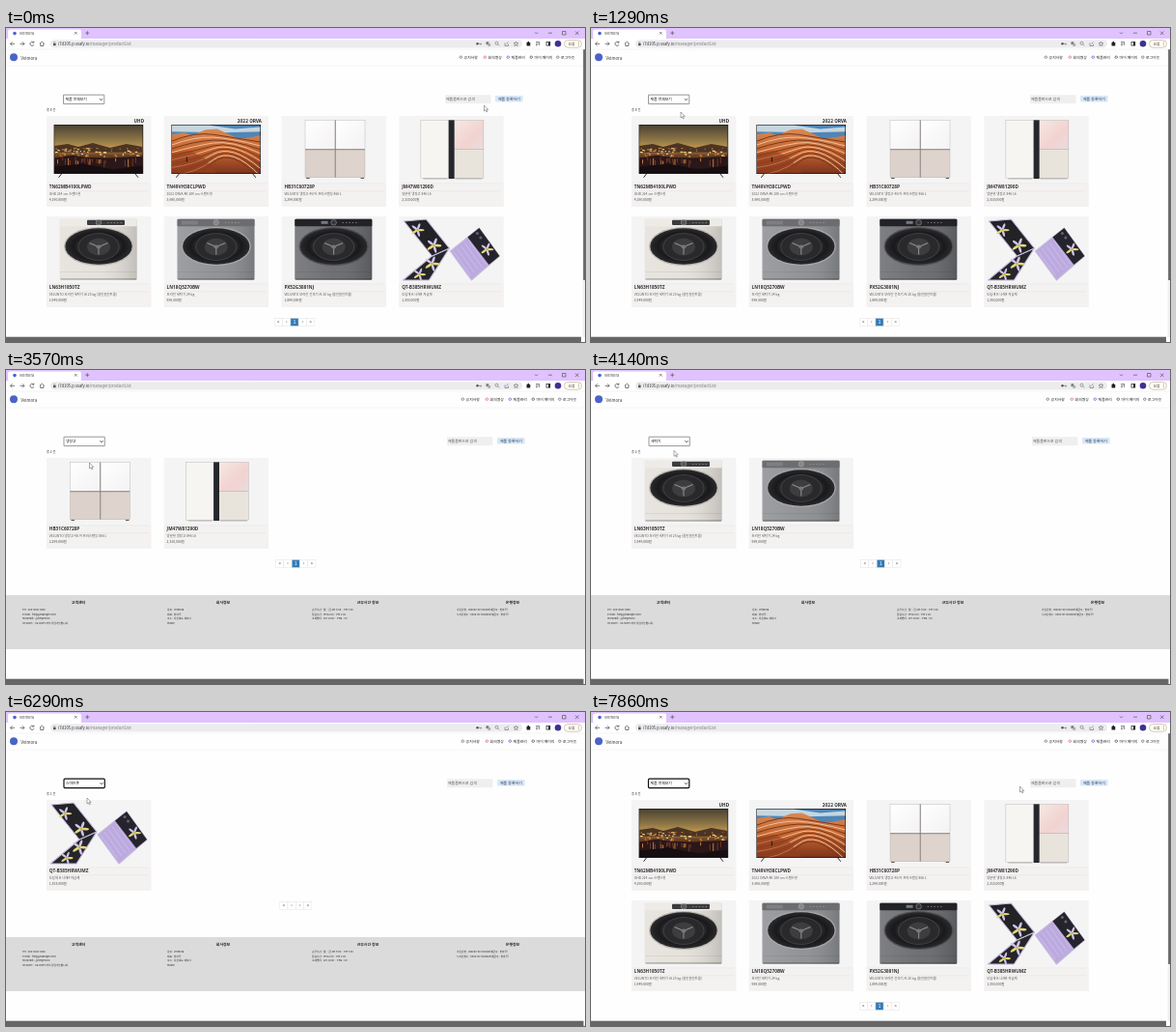
These frames come from a looping animation (600x325 px, 8000 ms). An HTML page:

```html
<!DOCTYPE html>
<html lang="ko">
<head>
<meta charset="utf-8">
<title>Velmora</title>
<style>
html, body { margin: 0; width: 100%; height: 100%; overflow: hidden; background: #fff; }
svg { display: block; width: 600px; height: 325px; font-family: 'Noto Sans CJK KR', 'Noto Sans', sans-serif; }
</style>
</head>
<body>
<svg viewBox="0 0 600 325">
  <defs>
    <linearGradient id="dusk" x2="0" y2="1">
      <stop stop-color="#4b4233"/><stop offset=".3" stop-color="#8a7447"/><stop offset=".5" stop-color="#c99a4c"/>
      <stop offset=".62" stop-color="#6d4424"/><stop offset="1" stop-color="#1c1012"/>
    </linearGradient>
    <linearGradient id="rock" x2="0" y2="1">
      <stop stop-color="#d98a55"/><stop offset=".5" stop-color="#c4642f"/><stop offset="1" stop-color="#7d351d"/>
    </linearGradient>
    <linearGradient id="rose" x2="1" y2="1">
      <stop stop-color="#f6e8e4"/><stop offset=".6" stop-color="#f1d3d0"/><stop offset="1" stop-color="#eadbe0"/>
    </linearGradient>
    <linearGradient id="white" x2="1" y2="1">
      <stop stop-color="#fff"/><stop offset="1" stop-color="#f4f2f3"/>
    </linearGradient>
    <linearGradient id="shade" x2="1">
      <stop stop-color="#fff" stop-opacity=".15"/><stop offset=".5" stop-color="#fff" stop-opacity=".05"/>
      <stop offset="1" stop-color="#000" stop-opacity=".15"/>
    </linearGradient>
    <radialGradient id="glass">
      <stop stop-color="#6a6a6c"/><stop offset=".45" stop-color="#3c3c3e"/><stop offset=".75" stop-color="#19191b"/><stop offset="1" stop-color="#2a2a2c"/>
    </radialGradient>
  </defs>
  <g id="page"></g>
  <g id="chrome"></g>
  <path id="cursor" d="M0 0V6L1.4 4.8 2.4 6.9 3.3 6.5 2.4 4.4H4.2Z" fill="#fff" stroke="#555" stroke-width=".5"/>
</svg>
<script>
const $ = id => document.getElementById(id);
const rect = (x, y, w, h, fill, more = '') => `<rect x="${x}" y="${y}" width="${w}" height="${h}" fill="${fill}" ${more}/>`;
const text = (x, y, size, s, fill = '#333', more = '') => `<text x="${x}" y="${y}" font-size="${size}" fill="${fill}" ${more}>${s}</text>`;
const poly = (points, fill, more = '') => `<polygon points="${points}" fill="${fill}" ${more}/>`;
const oval = (x, y, rx, ry, fill, more = '') => `<ellipse cx="${x}" cy="${y}" rx="${rx}" ry="${ry}" fill="${fill}" ${more}/>`;
const line = (d, color, w = .6) => `<path d="${d}" fill="none" stroke="${color}" stroke-width="${w}"/>`;
const times = (n, f) => Array.from({ length: n }, (_, i) => f(i)).join('');
const noise = i => Math.abs(Math.sin(i * 127.1 + 3) * 43758.5) % 1;
const bold = 'font-weight="700"';
const medium = 'font-weight="500"';
const mid = 'text-anchor="middle"';

// Product pictures, in coordinates of their card
const tv = (label, scene) =>
  text(101, 7.4, 4.7, label, '#222', bold + ' text-anchor="end"') +
  rect(7.6, 9, 92.6, 51, '#1d1a1b') +
  `<svg x="8.1" y="9.5" width="91.6" height="49.7" viewBox="0 0 92 51" preserveAspectRatio="none">${scene}</svg>` +
  line('M15.5 60L12.5 63.8M92 60L95 63.8', '#333', 1);

const city = rect(0, 0, 92, 51, 'url(#dusk)') +
  poly('0,22 14,20 25,23 40,19 58,24 75,20 92,23 92,29 0,29', '#4a3424') +
  times(80, i => rect(noise(i) * 92, 24 + noise(i + 200) * 9, .8 + noise(i + 7) * 2.4, 1,
    ['#ffd877', '#e58a32', '#fff0b8', '#a4482a'][i % 4])) +
  poly('0,35 18,32 34,34 56,35 92,33 92,51 0,51', '#2a171a') +
  times(26, i => rect(noise(i + 40) * 92, 34 + noise(i + 90) * 5, .9, 3 + noise(i) * 6, i % 3 ? '#7c3b26' : '#d2893f')) +
  poly('0,44 30,41 62,47 92,43 92,51 0,51', '#170e11');

const canyon = rect(0, 0, 92, 51, '#4f86b8') +
  poly('0,0 38,0 66,4 92,2 92,7 52,8 0,7', '#c5d6e0') +
  poly('0,10 13,8 21,11 35,5 47,4 58,9 70,15 92,11 92,51 0,51', 'url(#rock)') +
  times(11, i => line(`M0 ${17 + i * 4}Q24 ${7 + i * 5} 43 ${10 + i * 3}T92 ${18 + i * 4}`, i % 2 ? '#f0c29a' : '#7d3519', 1)) +
  poly('0,30 18,27 34,35 47,51 0,51', '#96401f', 'opacity=".6"') + rect(15, 34, 1.2, 5, '#222');

const door = (x, y, w, h, fill) => rect(x, y, w, h, fill, 'stroke="#a9a2a0" stroke-width=".35"');
const fourDoor =
  door(24.4, 4.5, 31, 30, 'url(#white)') + door(56, 4.5, 30.4, 30, 'url(#white)') +
  door(24.4, 35, 31, 28.8, '#ddd2cb') + door(56, 35, 30.4, 28.8, '#ded4cd') +
  line('M24.4 34.7H86.4M55.7 4.5V63.8', '#77706e', .7) + line('M25.5 64.5H29M82 64.5H85.5', '#555', 1);
const sideBySide =
  door(22.5, 4.5, 29, 60, '#f7f5f1') + door(57, 4.5, 30.5, 30, 'url(#rose)') + door(57, 34.8, 30.5, 29.7, '#e8e4db') +
  rect(51.3, 4.3, 5.9, 60.7, '#25272c') + line('M25 65H50M58 65H86', '#888', .6);

function machine(body, panel, ring, display) {
  return rect(13.7, 2.8, 80, 63, body, 'rx="1.2"') + rect(13.7, 2.8, 80, 63, 'url(#shade)', 'rx="1.2"') +
    rect(13.7, 2.8, 80, 7.5, panel, 'rx="1"') + display +
    oval(54, 31, 36, 20, ring) + oval(54, 31, 34.7, 18.7, 'url(#glass)') +
    oval(54, 31.5, 21, 14, '#29292b', 'stroke="#5d5d60" stroke-width=".5"') + oval(54, 31.5, 12, 9, '#3d3d40') +
    times(3, i => {
      const a = (i * 120 + 90) * Math.PI / 180;
      return line(`M54 31.5L${54 + 11 * Math.cos(a)} ${31.5 + 8 * Math.sin(a)}`, '#8d8d90', 1.1);
    }) + oval(54, 31.5, 2.5, 2.1, '#77777a') + line('M14 57.5H93.4', '#0002', .5) + rect(14.5, 64, 78.5, 1.8, '#0003');
}
const dial = color => oval(54, 6.3, 2.8, 2.8, color, 'stroke="#aaa" stroke-width=".5"');
const dots = times(5, i => rect(63 + i * 3.4, 6, 1.4, .6, '#aaa'));
const creamWasher = machine('#e4e0da', '#eeebe6', '#bcb8b2', rect(42, 3.8, 39, 5.3, '#3b3b3e', 'rx="1"') + dial('#55555a') + dots);
const greyWasher = machine('#8c8e91', '#6b6d70', '#a7a8ab', rect(18, 4.5, 17, 4, '#7d7f82') + dial('#85878b') + dots);
const dryer = machine('#68696d', '#222327', '#505155', dial('#35363b') + rect(41, 4.8, 7, 3, '#737984') + dots);

const bloom = (x, y, r) => times(5, i => oval(x, y - r, r * .34, r, i % 2 ? '#e3da7a' : '#cfc4ea',
  `transform="rotate(${i * 72 + 20} ${x} ${y})"`)) + oval(x, y, r * .3, r * .3, '#c9b848');
const edge = 'stroke="#c6bbdc" stroke-width="1.1" stroke-linejoin="round"';
const phones =
  poly('4,66 31,66 52,33 34,41', '#25252b', edge) + poly('5,5 28,3 52,33 34,41', '#222227', edge) +
  bloom(19, 14, 3.6) + bloom(36, 30, 4) + bloom(34, 49, 4) + bloom(21, 60, 3.3) +
  poly('53,36 83,12 104,41 75,66', '#bcaadf', edge) + poly('71,21.5 83,12 104,41 93,50', '#25242c') +
  times(5, i => line(`M${56 + i * 4} ${36 - i * 2.8}L${74 + i * 4} ${61 - i * 2.8}`, '#cdc0ec', .8)) +
  bloom(91, 34, 3.5) + oval(81, 17.5, 1.5, 1.5, '#66636c') + oval(84.5, 22, 1.5, 1.5, '#66636c');

const products = [
  ['TN62MB4100LPWD', 'UHD 214 cm 스탠드형', '4,190,000', tv('UHD', city)],
  ['TN49VH38CLPWD', '2022 ORVA 4K 189 cm 스탠드형', '3,690,000', tv('2022 ORVA', canyon)],
  ['HB31C60728P', 'VELUNTO 냉장고 4도어 프리스탠딩 866 L', '2,299,000', fourDoor],
  ['JM47W81290D', '양문형 냉장고 846 L6', '2,310,000', sideBySide],
  ['LN63H1850TZ', 'VELUNTO 모리안 세탁기 AI 25 kg [올인원컨트롤]', '1,949,000', creamWasher],
  ['LN18Q5270BW', '모리안 세탁기 24 kg', '959,000', greyWasher],
  ['PX52G3081NJ', 'VELUNTO 모리안 건조기 AI 20 kg [올인원컨트롤]', '1,899,000', dryer],
  ['QT-B385HRWUMZ', '도담새 K 나래4 자급제', '1,353,000', phones],
];

function card(product, i) {
  const [code, about, price, picture] = products[product];
  return `<g transform="translate(${42 + i % 4 * 121.8} ${91 + (i >> 2) * 104})">` +
    rect(0, 0, 108.3, 94, '#f4f4f4') + rect(0, 69.5, 108.3, 24.5, '#f4f1f1') + picture +
    line('M2 70H106M2 77.8H106', '#e6e1e1', .5) +
    text(2.8, 75.4, 4.7, code, '#333', 'font-weight="600" font-family="Noto Sans, sans-serif"') +
    text(2.8, 82.2, 3.35, about, '#555') + text(2.8, 88, 3.4, price + '원', '#444') + '</g>';
}

const footer = [
  ['고객센터', 'Tel : 000-0000-0000', 'E-mail : help@example.com', 'MoruTalk : @helper204', '09:00AM ~ 06:00PM 까지 상담가능합니다.'],
  ['회사정보', '상호 : Velmora', '대표 : 한아무', '주소 : 다온북도 새미시', 'MIRAE'],
  ['근무시간 정보', '근무시간 : 월 ~ 금 AM 9:00 ~ PM 7:00', '점심시간 : PM12:00 ~ PM 1:00', '고객센터 : AM 10:00 ~ PM6 : 00'],
  ['은행정보', '가온은행 : 000000-00-000000(예금주 : 한아무)', '누리은행소 : 0000-00-0000000(예금주 : 한아무)'],
];
const footerMarkup = rect(0, 233, 600, 56, '#dcdbdc') + footer.map(([title, ...rows], i) =>
  text(75 + i * 150, 242.4, 3.9, title, '#222', mid + ' ' + bold) +
  rows.map((row, j) => text(17 + i * 150, 249 + j * 4.6, 2.65, row, '#222', medium)).join('')).join('');

const nav = [[471, '공지사항', '#666'], [496, '회의영상', '#d8578b'], [520, '제품관리', '#5b51c5'],
  [544, '마이 페이지', '#444'], [571.5, '로그아웃', '#666']];

function pager(tall, count) {
  const marks = count > 1 ? ['«', '‹', '1', '›', '»'] : ['«', '‹', '›', '»'];
  const x0 = (tall ? 299 : 300.3) - (marks.length - 1) * 4.15, y = tall ? 300.3 : 196.3;
  return marks.map((m, i) => {
    const x = x0 + i * 8.3, on = m === '1';
    return rect(x - 4.1, y, 8.2, 8.2, on ? '#337ab7' : '#fff', 'stroke="#e3e3e3" stroke-width=".5"') +
      text(x, y + 5.9, 5.4, m, on ? '#fff' : '#555', mid);
  }).join('');
}

function pageMarkup({ label, list, focus }) {
  const tall = list.length > 4, dx = tall ? 0 : 2, sx = tall ? 59.5 : 60;
  return rect(0, 22, 600, 303, '#fefefe') + oval(8, 30.3, 4, 4, '#4b63c8') + text(15.5, 32.5, 4.3, 'Velmora', '#333') +
    nav.map(([x, name, color]) => oval(x + dx + .3, 30.2, 1.3, 1.2, 'none', `stroke="${color}" stroke-width=".7"`) +
      text(x + dx + 3.6, 31.8, 3.85, name, '#222', medium)).join('') +
    line('M0 39H600', '#efefef', .6) +
    rect(sx, 69.2, 42.3, 9.4, '#fff', `rx="${focus ? 1 : .3}" stroke="${focus ? '#111' : '#555'}" stroke-width="${focus ? 1.2 : .6}"`) +
    text(sx + 2, 75.3, 3.85, label, '#111', medium) + line(`M${sx + 37.5} 73.2l1.5 1.6 1.5-1.6`, '#222', .8) +
    text(42, 86.4, 3.2, `총 ${list.length} 건`, '#222', medium) +
    rect(455 + dx, 69.3, 47.5, 9, '#efefef', 'rx=".8"') + text(456 + dx, 75.1, 3.9, '제품품번으로 검색', '#555') +
    rect(507 + dx, 70, 28.7, 6.5, '#d9e8f8', 'rx=".8"') + text(521.4 + dx, 74.7, 3.95, '제품 등록하기', '#26364f', mid + ' ' + medium) +
    list.map(card).join('') + pager(tall, list.length) + (tall ? '' : footerMarkup) +
    rect(0, 319.7, tall ? 596 : 598.5, 5.3, '#666') +
    (tall ? rect(597.5, 22, 2.5, 298, '#f1f1f1') + rect(598.2, 22, 1.8, 239, '#666') : '');
}

$('chrome').innerHTML = rect(0, 0, 600, 11, '#dfc2fe') + rect(2, 1.5, 76, 10, '#fff', 'rx="2"') +
  oval(9, 5.6, 1.8, 1.8, '#4b63c8') + text(14, 7, 3.9, 'Velmora', '#444') +
  line('M71 4l2.6 2.6m0-2.6l-2.6 2.6M82.3 5.2h4M84.3 3.2v4M548 4.5l1.5 1.5 1.5-1.5M562 5.2h4M576.5 3.5h3.5v3.5h-3.5zM590 3.5l3.5 3.5m0-3.5l-3.5 3.5', '#444', .6) +
  rect(0, 11, 600, 11, '#fff') + rect(46, 12.2, 489, 8.2, '#ececef', 'rx="4.1"') +
  line('M9 16.3H4.5m2-2l-2 2 2 2M14.5 16.3h4.5m-2-2l2 2-2 2M28.5 14.8a2.1 2.1 0 1 0 .5 2.3M28.9 13.6v1.6h-1.6M35 16.2l2.3-2.1 2.3 2.1M35.7 15.7v2.8h3.2v-2.8', '#444', .7) +
  rect(49, 16, 2.6, 2.2, '#555') + line('M49.6 16v-.8a.7.7 0 0 1 1.4 0v.8', '#555', .5) +
  text(54, 17.8, 4.2, 'i7d105.p.ssafy.io<tspan fill="#777">/manager/productList</tspan>', '#333') +
  line('M489 16.3h4m-1 0v1.4M507 15.7a1.5 1.5 0 1 0 3 0 1.5 1.5 0 1 0-3 0M509.6 16.8l1.6 1.6M517 15.5v3h3.5v-2M518.5 16.5l2-2.2M528.5 14l.7 1.6 1.7.1-1.3 1.1.4 1.7-1.5-.9-1.5.9.4-1.7-1.3-1.1 1.7-.1z', '#666', .6) +
  oval(488.5, 16.3, 1.2, 1.2, '#555') + rect(497.5, 14.3, 2.8, 2.8, '#777') + rect(499.3, 16, 2.8, 2.8, '#aaa') +
  rect(539.5, 14.9, 3.8, 3.5, '#222', 'rx=".5"') + oval(541.3, 14.7, .9, .9, '#222') +
  line('M549 14.6h4M549 16.2h2.6M549 17.8h2M552.7 15v3', '#333', .6) +
  rect(560, 14.5, 3.8, 3.6, '#fff', 'stroke="#222" stroke-width=".7"') + rect(562, 14.5, 1.8, 3.6, '#222') +
  oval(572, 16.3, 3.3, 3.3, '#3e3193') +
  rect(578.5, 12.5, 18, 7.7, '#fffdf8', 'rx="3.8" stroke="#b9a889" stroke-width=".6"') + text(582.5, 17.7, 3.9, '오류', '#443822') +
  times(3, i => oval(593.3, 14.7 + i * 1.6, .45, .45, '#5e5036')) + line('M0 22H600', '#e9e9eb', .5);

const all = [0, 1, 2, 3, 4, 5, 6, 7];
const states = [
  { at: 0, label: '제품 전체보기', list: all },
  { at: 11, label: 'TV', list: [0, 1] },
  { at: 19, label: '냉장고', list: [2, 3] },
  { at: 27, label: '세탁기', list: [4, 5] },
  { at: 35, label: '건조기', list: [6], focus: true },
  { at: 43, label: '스마트폰', list: [7], focus: true },
  { at: 51, label: '제품 전체보기', list: all, focus: true },
];

// Pointer tip: step, x, y; seven steps per second
const path = [[0, 495.5, 80], [7, 100, 75], [8, 93, 76], [9, 93, 87], [11, 92, 87], [14, 91, 76], [17, 90, 91], [19, 90, 91],
  [22, 88, 76], [25, 86.5, 96], [27, 86, 98], [30, 86, 76], [33, 86, 103], [34, 86, 103], [35, 85.3, 88],
  [37, 85, 76], [40, 85, 108], [43, 85, 108], [44, 84, 89], [46, 84, 76], [49, 85, 82], [51, 88, 82], [55, 444.5, 77]];

let shown;
function draw(now) {
  const step = Math.floor((now % 8000 + 4) * 7 / 1000);
  const state = states.findLast(s => s.at <= step);
  if (state !== shown) $('page').innerHTML = pageMarkup(shown = state);
  const n = path.findIndex(p => p[0] > step);
  const b = n < 0 ? path.at(-1) : path[n], a = n < 0 ? b : path[n - 1];
  const k = b === a ? 0 : (step - a[0]) / (b[0] - a[0]);
  const x = a[1] + (b[1] - a[1]) * k, y = a[2] + (b[2] - a[2]) * k;
  $('cursor').setAttribute('transform', `translate(${x} ${y})`);
}
const start = performance.now();
function loop() {
  draw(performance.now() - start);
  requestAnimationFrame(loop);
}
loop();
</script>
</body>
</html>
```
